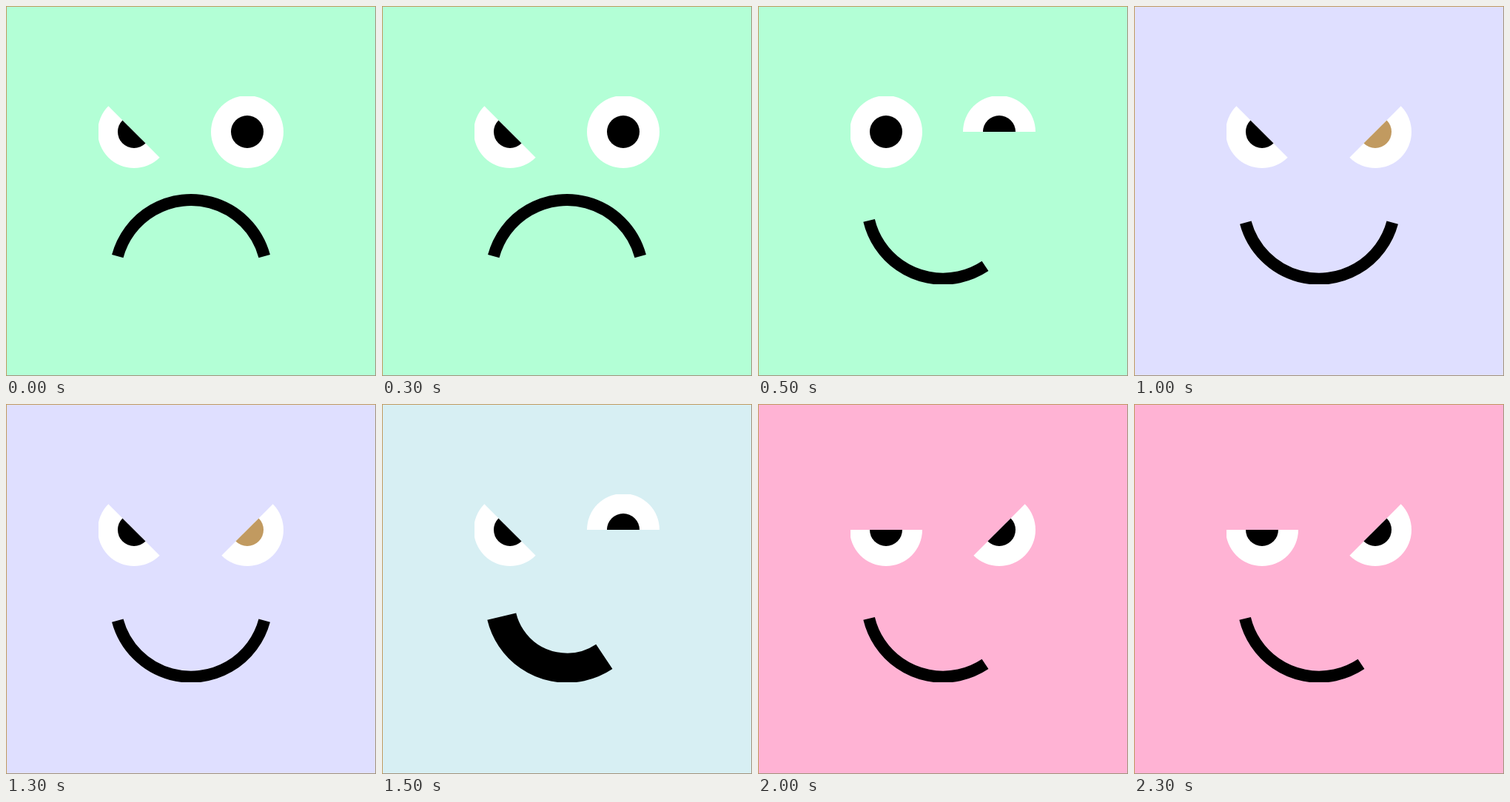
These frames come from a looping animation (500x500 px, 2500 ms). An HTML page with a canvas:

```html
<!DOCTYPE html>
<html lang="en">
<head>
<meta charset="utf-8">
<title>Changing faces</title>
<style>
  html, body { margin: 0; width: 100%; height: 100%; overflow: hidden; }
  canvas { display: block; }
</style>
</head>
<body>
<canvas id="stage" width="500" height="500"></canvas>
<script>
const ctx = document.getElementById('stage').getContext('2d');
const HOLD = 500;
const TAN = '#c19a60';
const rad = degrees => degrees * Math.PI / 180;

// Eye shapes: start angle and sweep in degrees
const open = [0, 360];
const topHalf = [180, 180];
const bottomHalf = [0, 180];
const leftGlare = [45, 180];
const rightGlare = [-45, 180];

// Mouth shapes: centre y, start and end angle, thickness
const frown = [364.7, 195, 345, 16];
const smile = [266, 15, 165, 16];
const smirk = [266, 56.3, 166.6, 16];
const thickSmirk = [266, 56.3, 166.6, 40];

const faces = [
  { back: '#b3ffd6', left: leftGlare, right: open, mouth: frown },
  { back: '#b3ffd6', left: open, right: topHalf, mouth: smirk },
  { back: '#dfdfff', left: leftGlare, right: rightGlare, mouth: smile, rightPupil: TAN },
  { back: '#d7eff3', left: leftGlare, right: topHalf, mouth: thickSmirk },
  { back: '#ffb3d4', left: bottomHalf, right: rightGlare, mouth: smirk }
];

function sector(x, radius, [start, sweep], color) {
  ctx.fillStyle = color;
  ctx.beginPath();
  ctx.arc(x, 170, radius, rad(start), rad(start + sweep));
  ctx.fill();
}

function drawEye(x, shape, pupil = '#000') {
  sector(x, 49, shape, '#fff');
  sector(x, 22, shape, pupil);
}

function drawMouth([y, start, end, width]) {
  ctx.strokeStyle = '#000';
  ctx.lineWidth = width;
  ctx.beginPath();
  ctx.arc(250, y, 110.7 - width / 2, rad(start), rad(end));
  ctx.stroke();
}

function drawBorder() {
  ctx.fillStyle = '#a3937c';
  ctx.fillRect(499, 0, 1, 500);
  ctx.fillRect(0, 499, 500, 1);
  ctx.fillStyle = TAN;
  ctx.fillRect(0, 0, 500, 1);
  ctx.fillRect(0, 0, 1, 500);
}

function draw(time) {
  const face = faces[Math.floor(time / HOLD) % faces.length];
  ctx.fillStyle = face.back;
  ctx.fillRect(0, 0, 500, 500);
  drawBorder();

  ctx.save();
  ctx.beginPath();
  ctx.rect(125, 122, 250, 254);
  ctx.clip();
  drawEye(173, face.left);
  drawEye(326, face.right, face.rightPupil);
  drawMouth(face.mouth);
  ctx.restore();
}

const begin = performance.now();
function tick() {
  draw(performance.now() - begin);
  requestAnimationFrame(tick);
}
tick();
</script>
</body>
</html>
```
